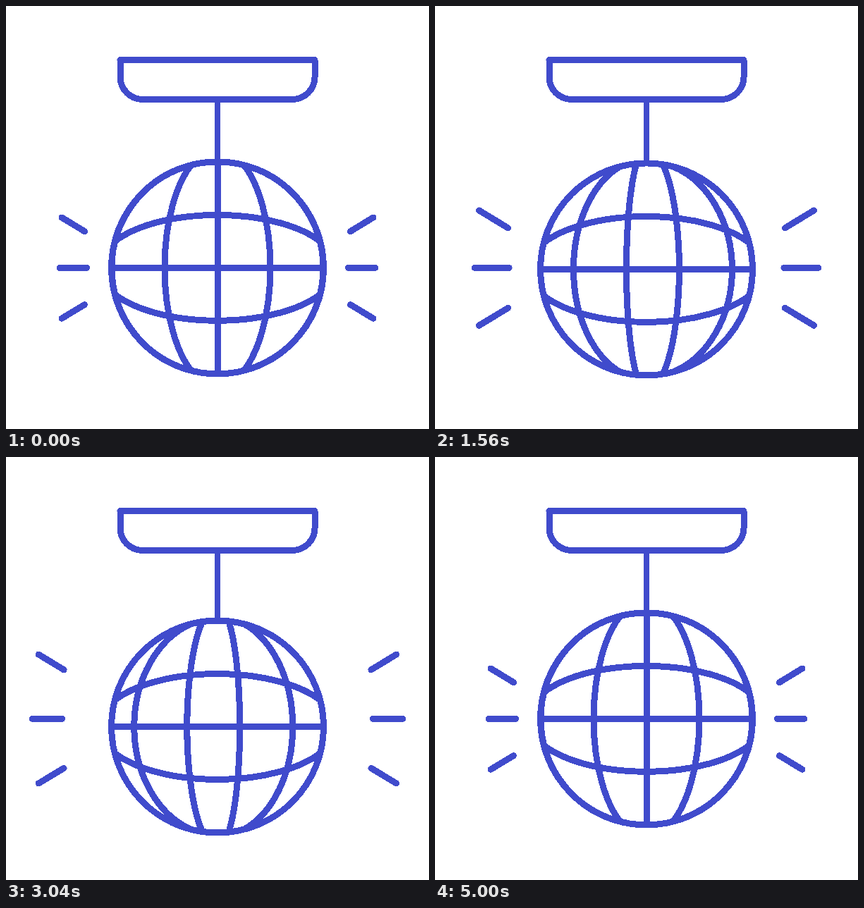
Animation of 600x600 px, one loop 5160 ms. Source, as an HTML page:

```html
<!DOCTYPE html>
<html lang="en">
<head>
<meta charset="utf-8">
<title>Mirror ball</title>
<style>
  html, body { margin: 0; width: 100%; height: 100%; overflow: hidden; background: #fff; }
  svg { display: block; width: 100vw; height: 100vh; }
  path, circle {
    fill: none; stroke: #404bcc; stroke-width: 9; stroke-linejoin: round;
    shape-rendering: crispEdges;
  }
  #cord { stroke-width: 8; }
  #lamp { fill: #fff; }
  #rays { stroke-linecap: round; }
</style>
</head>
<body>
<svg viewBox="0 0 600 600">
  <g id="ball">
    <path id="cord" d="M0 -260V-150"/>
    <circle r="150.500"/>
    <path id="parallels"/>
    <path id="meridians"/>
  </g>
  <path id="lamp" d="M162 76.500H438V100.500a32 32 0 0 1 -32 32H194a32 32 0 0 1 -32 -32Z"/>
  <path id="rays"/>
</svg>
<script>
const LOOP = 5160, STEP = 40;
const R = 150.5, CX = 300, CY = 371.4, GAP = 75;
const SPIN_TIME = 4300, TURN = 4 * GAP;
const RAY_EVERY = 667, RAY_TIME = 600, RAY_LAG = 265, RAY_AGE = 295;
const el = id => document.getElementById(id);
const clamp = x => Math.min(1, Math.max(0, x));

// Same curve as a CSS cubic-bezier().
function bezier(x1, y1, x2, y2) {
  const at = (a, b, s) => 3 * (1 - s) ** 2 * s * a + 3 * (1 - s) * s * s * b + s ** 3;
  return x => {
    let lo = 0, hi = 1;
    for (let i = 0; i < 24; i++) {
      const mid = (lo + hi) / 2;
      if (at(x1, x2, mid) < x) lo = mid; else hi = mid;
    }
    return at(y1, y2, lo);
  };
}

const smooth = x => clamp(x) ** 2 * (3 - 2 * clamp(x));
const softStop = bezier(0.2, 0.1, 0.667, 1);
const overshoot = bezier(0.167, 0, 0.85, 1.27);

// Ball height: [time, offset, easing towards it].
const BOB = [[0, 0], [920, 14.4, smooth], [1840, -1.5, smooth], [2720, 14.4, softStop], [3750, 0, smooth]];

function bob(t) {
  const i = BOB.findIndex(key => key[0] > t);
  if (i < 0) return 0;
  const [t0, y0] = BOB[i - 1], [t1, y1, ease] = BOB[i];
  return y0 + (y1 - y0) * ease((t - t0) / (t1 - t0));
}

const spin = t => t < SPIN_TIME ? TURN * overshoot(t / SPIN_TIME) : TURN;

// Time for the rays: gathers speed, runs evenly, settles after five rounds.
function rayClock(t) {
  const lag = 124, settle = 80, end = 5 * RAY_EVERY;
  const run = t - lag * (1 - Math.exp(-t / lag));
  return RAY_AGE + end - settle * Math.log(1 + Math.exp((end - run) / settle));
}

// Elliptic arc bulging by d, cut off where it meets the outline.
function bulge(d, flat) {
  const size = Math.abs(d), side = Math.sign(d);
  if (size < 0.2) return `M0 ${-R}V${R}`;
  const near = Math.min(size, GAP) / 2, far = Math.sqrt(R * R - near * near);
  const radius = far / Math.sqrt(1 - (near / size) ** 2);
  return flat
    ? `M${-far} ${side * near}A${radius} ${size} 0 0 ${d < 0 ? 1 : 0} ${far} ${side * near}`
    : `M${side * near} ${-far}A${size} ${radius} 0 0 ${d > 0 ? 1 : 0} ${side * near} ${far}`;
}

function meridians(shift) {
  let d = "";
  for (let x = shift % GAP - 2 * GAP; x <= 2 * GAP; x += GAP) d += bulge(x, false);
  return d;
}

// Inner and outer ends of the left rays; the right ones mirror them.
const RAYS = [[112, 320, 44.5, 279], [115, 371.3, 35, 371.3], [112, 423.3, 44.5, 464]];

function dash(from, to) {
  let d = "";
  for (const [x0, y0, x1, y1] of RAYS) {
    const x = p => x0 + (x1 - x0) * p, y = p => y0 + (y1 - y0) * p;
    d += `M${x(from)} ${y(from)}L${x(to)} ${y(to)}`;
    d += `M${2 * CX - x(from)} ${y(from)}L${2 * CX - x(to)} ${y(to)}`;
  }
  return d;
}

function rays(clock) {
  let d = "";
  for (let age = clock % RAY_EVERY; age < RAY_TIME + RAY_LAG; age += RAY_EVERY) {
    const from = smooth((age - RAY_LAG) / RAY_TIME), to = smooth(age / RAY_TIME);
    if (to > 0.001 && from < 0.995) d += dash(from, to);
  }
  return d;
}

el("parallels").setAttribute("d", bulge(-GAP, true) + `M${-R} 0H${R}` + bulge(GAP, true));

const start = performance.now();
function draw() {
  const now = (performance.now() - start) % LOOP;
  const t = Math.floor(now / STEP) * STEP;
  el("ball").setAttribute("transform", `translate(${CX} ${CY + bob(t)})`);
  el("meridians").setAttribute("d", meridians(spin(t)));
  el("rays").setAttribute("d", rays(rayClock(t)));
  requestAnimationFrame(draw);
}
draw();
</script>
</body>
</html>
```
